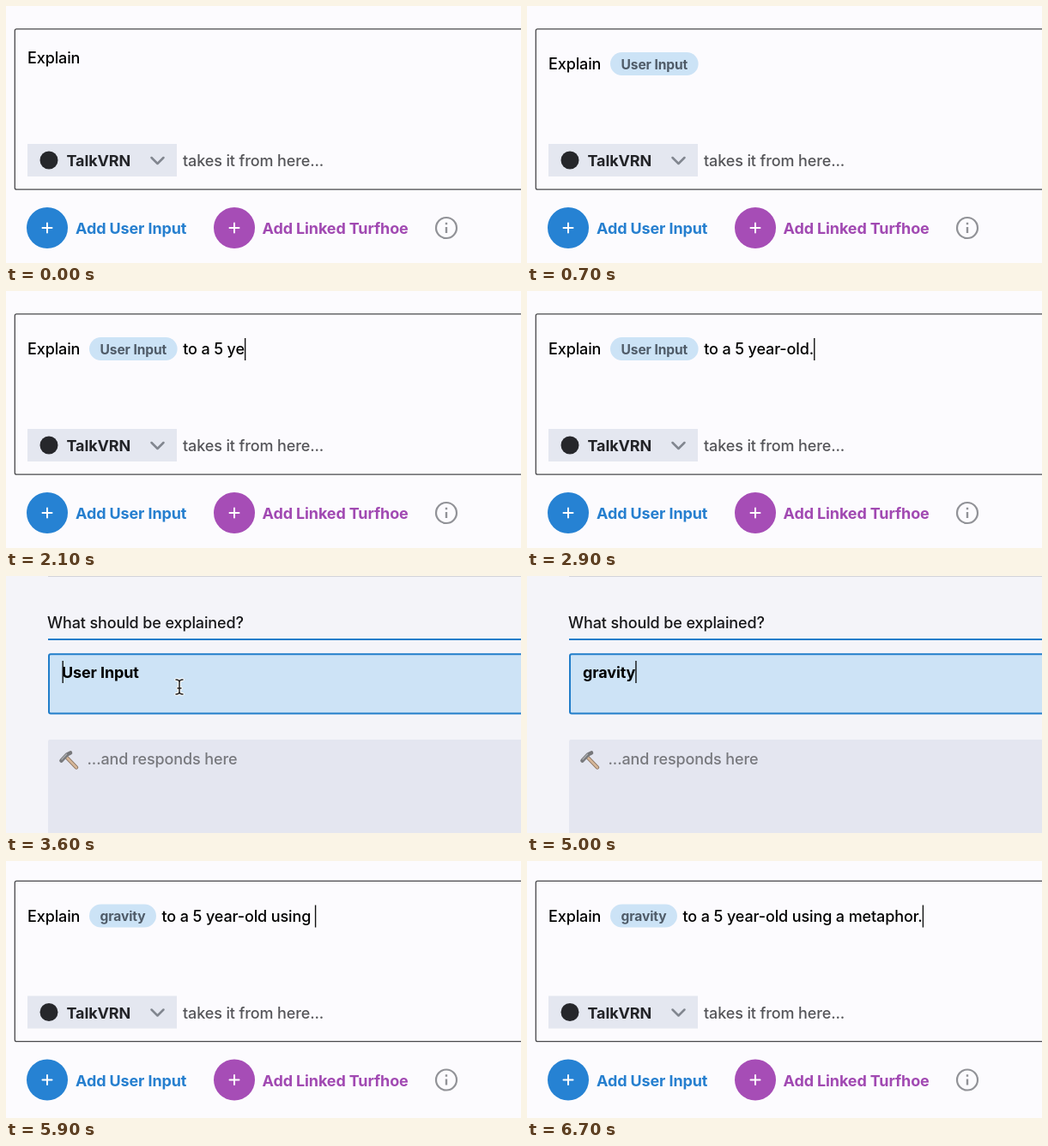
Write an HTML page that moves like this. It is 600x300 px and loops after 6.8 s.

```html
<!DOCTYPE html>
<html lang="en">
<head>
<meta charset="utf-8">
<title>Prompt builder</title>
<style>
  html, body { margin: 0; width: 100%; height: 100%; overflow: hidden; }
  svg { display: block; width: 600px; height: 300px; }
  text { font: 450 18px Inter, Roboto, sans-serif; white-space: pre; letter-spacing: -.12px; }
  .bold { font-weight: 700; }
  .line { fill: none; stroke-linecap: round; stroke-linejoin: round; }
  #chip text { font-size: 15.6px; fill: #4f5b68; }
</style>
</head>
<body>
<svg viewBox="0 0 600 300">
  <defs>
    <path id="beam" d="M198 121q4 0 4 3q0-3 4-3M202 124v11M198 138q4 0 4-3q0 3 4 3M200 131h4"/>
    <path id="handle" d="M70 211l12 12.500"/>
  </defs>
  <g id="editor">
    <rect y="-10" width="600" height="330" fill="#fcfbfe"/>
    <rect x="10.300" y="26.900" width="620" height="187.300" rx="2" fill="none" stroke="#48484b" stroke-width="1.300"/>
    <text id="verb" x="25">Explain</text>
    <g id="chip">
      <rect x="97" y="54" height="27" rx="13.500" fill="#cce3f6"/>
      <text class="bold" x="109.500" y="73.500"></text>
    </g>
    <text id="rest" y="74"></text>

    <rect x="25" y="161" width="174" height="38" fill="#e4e7f0"/>
    <circle cx="50" cy="180" r="10.500" fill="#26272b"/>
    <text class="bold" x="70.500" y="187" fill="#222327">TalkVRN</text>
    <path class="line" d="M169.500 177l7 7 7-7" stroke="#81868f" stroke-width="2.500"/>
    <text x="206" y="187" fill="#555559">takes it from here...</text>

    <circle cx="48" cy="259" r="24" fill="#2682d3"/>
    <circle cx="266" cy="259" r="24" fill="#a64db6"/>
    <path class="line" d="M42.500 259h11M48 253.500v11M260.500 259h11M266 253.500v11" stroke="#fff" stroke-width="2"/>
    <text class="bold" x="81" y="266" fill="#267fcf">Add User Input</text>
    <text class="bold" x="298.500" y="266" fill="#a149b2">Add Linked Turfhoe</text>
    <circle cx="513" cy="259" r="12" fill="none" stroke="#919297" stroke-width="2.200"/>
    <path d="M513 258v7M513 252.800v2.500" stroke="#919297" stroke-width="2.400"/>
  </g>

  <g id="form">
    <rect width="600" height="300" fill="#f4f4f9"/>
    <path d="M49 .5H600" stroke="#d3d4da"/>
    <text x="48" y="61" fill="#161618">What should be explained?</text>
    <path d="M49 74H600" stroke="#207dca" stroke-width="2.200"/>
    <rect x="50" y="91.200" width="570" height="69.300" rx="2" fill="#cde3f6" stroke="#207dca" stroke-width="2"/>
    <text id="answer" class="bold" x="65" y="119"></text>
    <rect x="49" y="191" width="560" height="120" rx="2" fill="#e4e6f0"/>
    <g class="line">
      <use href="#handle" stroke="#85705f" stroke-width="4.400"/>
      <use href="#handle" stroke="#d6b698" stroke-width="2.600"/>
      <path d="M64.500 215.500l6.500-7 4-2" stroke="#77787b" stroke-width="4.600"/>
      <path d="M65 214l5.500-6" stroke="#a9aaad" stroke-width="1.500"/>
    </g>
    <text x="94.500" y="220" fill="#77787d">...and responds here</text>
    <g id="pointer" class="line">
      <use href="#beam" stroke="#fff" stroke-width="3.500"/>
      <use href="#beam" stroke="#222" stroke-width="1.500"/>
    </g>
  </g>
  <rect id="caret" width="1.400" height="26" fill="#111"/>
</svg>
<script>
const $ = id => document.getElementById(id);
const [editor, form, verb, chip, rest, answer, pointer, caret] =
  ["editor", "form", "verb", "chip", "rest", "answer", "pointer", "caret"].map($);
const [pill, label] = chip.children;

const LOOP = 6800, CHIP_IN = 700, FORM_IN = 3400, FORM_OUT = 5100;
const show = (el, on) => el.style.display = on ? "" : "none";
const typed = (text, t, start, step) =>
  text.slice(0, Math.max(0, Math.floor((t - start) / step) + 1));
const endOf = el => +el.getAttribute("x") + el.getComputedTextLength();
const between = (t, a, b) => t >= a && t < b;

function placeCaret(x, y, on) {
  caret.setAttribute("x", x);
  caret.setAttribute("y", y);
  show(caret, on);
}

function drawForm(t) {
  const word = typed("gravity", t, 4200, 100);
  answer.textContent = word || "User Input";
  show(pointer, t < 4100);
  placeCaret(word ? endOf(answer) : 65.5, 99, t >= 3500);
}

function drawEditor(t) {
  const filled = t >= FORM_OUT, hasChip = t >= CHIP_IN, lift = filled ? -3.5 : 0;
  editor.setAttribute("transform", `translate(0 ${lift})`);
  verb.setAttribute("y", hasChip ? 74 : 67);
  show(chip, hasChip);
  if (!hasChip) {
    rest.textContent = "";
    placeCaret(endOf(verb) + 5, 48, between(t, 100, 500));
    return;
  }
  label.textContent = filled ? "gravity" : "User Input";
  const width = label.getComputedTextLength() + 25;
  pill.setAttribute("width", width);
  rest.setAttribute("x", 97 + width + 6.5);

  const phrase = "to a 5 year-old";
  if (!filled) {
    // typing rests for one beat at 1800
    rest.textContent = typed(phrase + ".", t < 1800 ? t : t - 100, 1200, 100);
  } else {
    rest.textContent = t < 5400 ? phrase + "."
      : phrase + typed(" using a metaphor.", t, 5500, 66);
  }
  placeCaret(endOf(rest), 55 + lift, between(t, 1000, FORM_IN) || t >= 5300);
}

function frame() {
  const t = Math.floor(performance.now() % LOOP / 100) * 100;
  const inForm = between(t, FORM_IN, FORM_OUT);
  show(editor, !inForm);
  show(form, inForm);
  (inForm ? drawForm : drawEditor)(t);
  requestAnimationFrame(frame);
}
frame();
</script>
</body>
</html>
```
